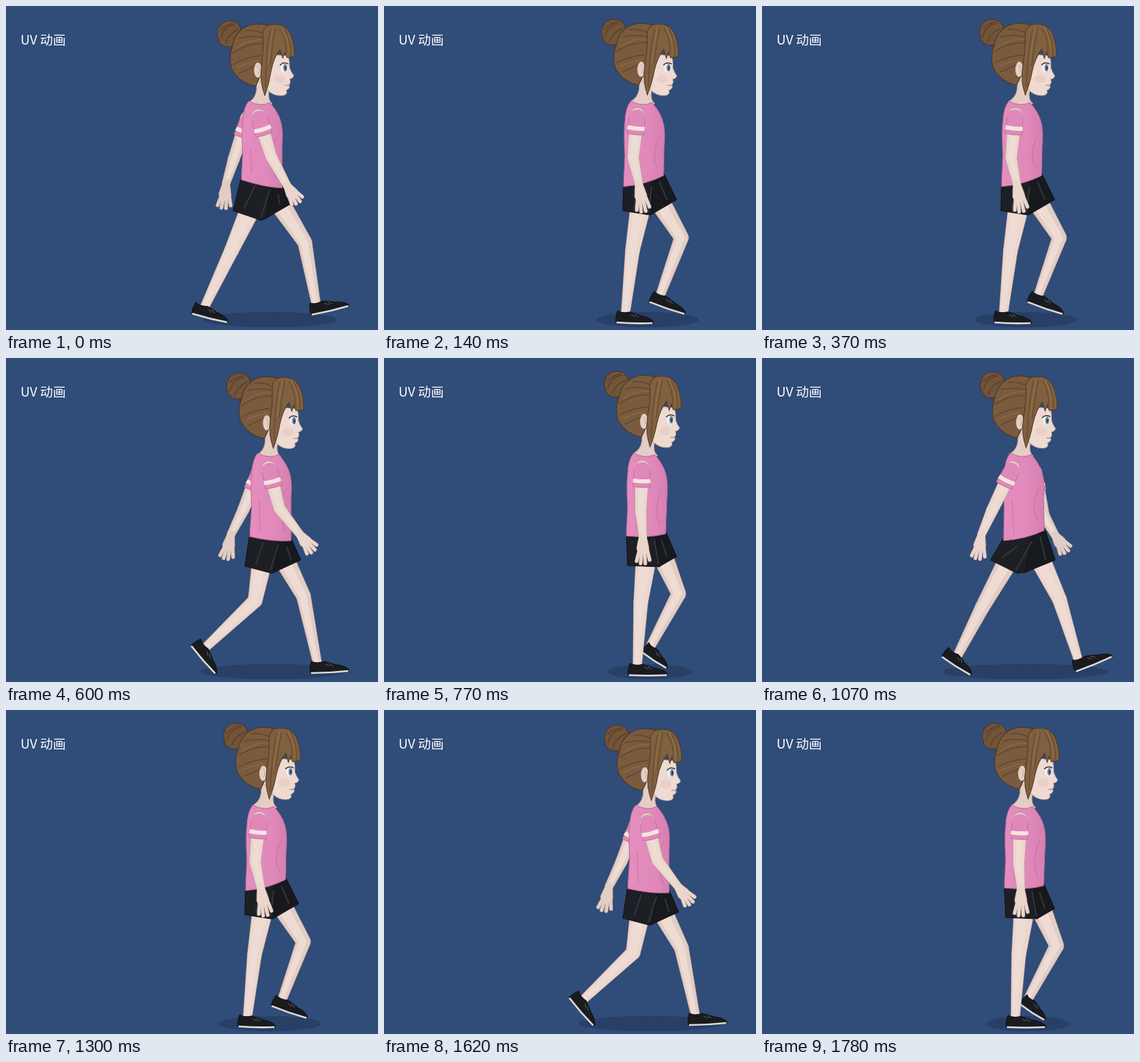
An HTML page with a canvas for the animation above (1860 ms loop, 539 by 470 pixels).

```html
<!DOCTYPE html>
<html lang="zh">
<head>
<meta charset="utf-8">
<style>
  html, body { margin: 0; width: 100%; height: 100%; overflow: hidden; background: #304c78; }
  canvas { display: block; }
</style>
</head>
<body>
<canvas id="stage" width="539" height="470"></canvas>
<script>
const ctx = document.getElementById('stage').getContext('2d');

const SKIN = '#ead6cd', SKIN_FAR = '#e2cdc4', SKIN_EDGE = '#b9a199';
const PINK = '#e088ba', PINK_EDGE = '#b9699a', HAIR = '#7a5b3e', HAIR_EDGE = '#4c3826';

// Six poses of one stride. Limbs are joint points x,y; feet are heel,toe;
// arms are shoulder,elbow,wrist,fingertips; shorts are the two leg openings.
const poses = [
  { head: [9, 0, .03], top: 8, hem: [350, 265, 409, 250], shadow: [262, 502],
    shorts: [331, 293, 369, 312, 381, 311, 425, 293],
    nearLeg: [402, 290, 431, 350, 457, 434], nearFoot: [454, 455, 508, 434],
    farLeg: [359, 290, 319, 362, 281, 436], farFoot: [260, 433, 302, 461],
    nearArm: [363, 160, 333, 222, 318, 256, 312, 293],
    farArm: [395, 165, 408, 228, 424, 256, 442, 283] },
  { head: [12, -1, .03], top: 10, hem: [351, 258, 408, 255], shadow: [325, 446],
    shorts: [353, 301, 399, 303, 400, 302, 424, 288],
    nearLeg: [380, 290, 372, 355, 367, 447], nearFoot: [354, 460, 411, 461],
    farLeg: [404, 288, 427, 342, 383, 424], farFoot: [373, 426, 409, 451],
    nearArm: [374, 159, 372, 222, 375, 258, 375, 300] },
  { head: [8, -1, .03], top: 6, hem: [347, 262, 405, 246], shadow: [308, 456],
    shorts: [346, 297, 384, 303, 388, 302, 424, 281],
    nearLeg: [372, 290, 360, 355, 350, 445], nearFoot: [336, 459, 390, 461],
    farLeg: [399, 283, 431, 336, 399, 423], farFoot: [384, 429, 436, 448],
    nearArm: [367, 158, 361, 220, 369, 257, 376, 300] },
  { head: [0, 0, 0], top: 0, hem: [341, 252, 400, 264], shadow: [285, 480],
    shorts: [329, 297, 370, 311, 378, 307, 411, 288],
    nearLeg: [356, 290, 327, 354, 288, 436], nearFoot: [269, 446, 321, 460],
    farLeg: [397, 287, 433, 343, 450, 436], farFoot: [442, 448, 497, 436],
    nearArm: [366, 160, 384, 218, 407, 260, 424, 287],
    farArm: [350, 163, 330, 222, 319, 257, 315, 295] },
  { head: [13, 1, .015], top: 13, hem: [353, 259, 413, 265], shadow: [282, 490],
    shorts: [346, 302, 384, 312, 388, 311, 427, 293],
    nearLeg: [372, 290, 361, 352, 289, 420], nearFoot: [268, 417, 303, 459],
    farLeg: [402, 290, 431, 345, 451, 442], farFoot: [441, 457, 497, 455],
    nearArm: [381, 160, 396, 218, 425, 255, 446, 282],
    farArm: [366, 165, 344, 220, 326, 256, 318, 293] },
  { head: [11, -1, .03], top: 9, hem: [350, 260, 407, 250], shadow: [316, 450],
    shorts: [351, 299, 390, 303, 393, 303, 424, 285],
    nearLeg: [400, 286, 430, 339, 392, 423], nearFoot: [379, 428, 427, 450],
    farLeg: [376, 290, 367, 355, 358, 446], farFoot: [345, 460, 400, 461],
    nearArm: [370, 159, 364, 221, 370, 257, 374, 300] }
];

// Each entry holds one pose; the holds are in hundredths of a second.
const order = [3, 2, 0, 5, 3, 2, 1, 5, 4, 2, 1, 5, 3, 2, 0, 5, 3, 2, 1, 0, 4, 3, 1];
const holds = [7, 8, 7, 8, 7, 8, 8, 7, 8, 9, 7, 8, 7, 8, 8, 7, 8, 16, 8, 8, 8, 8, 8];

function shape(d, fill, stroke, width = 1) {
  const path = new Path2D(d);
  if (fill) { ctx.fillStyle = fill; ctx.fill(path); }
  if (stroke) { ctx.strokeStyle = stroke; ctx.lineWidth = width; ctx.stroke(path); }
}

function oval(x, y, rx, ry, fill, turn = 0) {
  ctx.fillStyle = fill;
  ctx.beginPath();
  ctx.ellipse(x, y, rx, ry, turn, 0, 7);
  ctx.fill();
}

// Tapered tube through the joints.
function tube(p, widths, fill, edge) {
  const parts = [];
  for (let i = 0; i < widths.length; i++) {
    const [x, y, x2, y2] = p.slice(i * 2, i * 2 + 4), r = widths[i] / 2;
    const joint = new Path2D();
    joint.arc(x, y, r, 0, 7);
    parts.push(joint);
    if (i == widths.length - 1) break;
    const a = Math.atan2(y2 - y, x2 - x), nx = -Math.sin(a), ny = Math.cos(a), r2 = widths[i + 1] / 2;
    parts.push(new Path2D(`M${x + nx * r} ${y + ny * r}L${x2 + nx * r2} ${y2 + ny * r2}` +
      `L${x2 - nx * r2} ${y2 - ny * r2}L${x - nx * r} ${y - ny * r}Z`));
  }
  ctx.strokeStyle = edge;
  ctx.lineWidth = 1.4;
  if (edge) parts.forEach(s => ctx.stroke(s));
  ctx.fillStyle = fill;
  parts.forEach(s => ctx.fill(s));
}

function local(x, y, x2, y2, draw) {
  ctx.save();
  ctx.translate(x, y);
  ctx.rotate(Math.atan2(y2 - y, x2 - x));
  draw(Math.hypot(x2 - x, y2 - y));
  ctx.restore();
}

function leg(joints, foot, skin) {
  tube(joints, [29, 20, 12], skin, SKIN_EDGE);
  tube(joints.map((v, i) => v - (i % 2 ? 0 : 1)), [16, 11, 6], '#eedcd4');
  local(...foot, len => {
    ctx.scale(len / 55, 1);
    shape('M0 -1Q-1 -10 2 -17Q9 -13 20 -16Q29 -14 36 -11Q50 -9 55 -3L54 0Z', '#191b1f', '#0f1115');
    shape('M22 -12L28 -9M27 -13L33 -9', null, '#4c4f55', 1.3);
    shape('M1 0Q28 1 54 -1', null, '#dedbd6', 2.6);
  });
}

function hand(x, y, tx, ty, skin) {
  local(x, y, tx, ty, len => {
    ctx.lineCap = 'round';
    const fingers = [[-8, -11, .88], [-3, -4, 1], [2, 3.5, 1], [6, 10, .92]];
    for (const [color, width] of [[SKIN_EDGE, 5.6], [skin, 4.4]])
      for (const [from, to, reach] of fingers)
        shape(`M${len * .48} ${from * .8}L${len * reach - 2} ${to * .9}`, null, color, width);
    tube([0, 0, len * .42, 0], [11, 18], skin);
    shape(`M${len * .18} 7L${len * .45} 9M${len * .18} -7L${len * .45} -9`, null, SKIN_EDGE, .8);
    ctx.lineCap = 'butt';
  });
}

function arm(p, skin, size) {
  const [sx, sy, ex, ey, wx, wy, tx, ty] = p;
  tube(p.slice(0, 6), [20, 16, 11], skin, SKIN_EDGE);
  tube(p.slice(0, 6), [11, 8, 5], '#eedcd4');
  hand(wx, wy, tx, ty, skin);
  local(sx, sy, ex, ey, () => {
    const r = size / 2;
    shape(`M-4 ${-r * .75}Q14 ${-r} 28 ${-r}Q30 0 28 ${r}Q14 ${r} -4 ${r * .75}Q-12 0 -4 ${-r * .75}Z`, PINK);
    shape(`M4 ${-r * .9}L28 ${-r}Q30 0 28 ${r}L4 ${r * .9}`, null, PINK_EDGE, .8);
    shape(`M19 ${-r}Q21 0 19 ${r}`, null, '#f3e5df', 6);
  });
}

function inHead([dx, dy, turn], draw) {
  ctx.save();
  ctx.translate(370 + dx, 80 + dy);
  ctx.rotate(turn);
  ctx.translate(-370, -80);
  draw();
  ctx.restore();
}

function neck() {
  shape('M363 104L363 122Q361 135 351 140L371 153L386 142Q379 137 381 123Z', '#e3cdc4', SKIN_EDGE);
}

function face() {
  shape('M306 42Q306 26 320 22Q337 20 340 33Q342 47 331 57Q318 63 309 53Z', '#725439', HAIR_EDGE, 1.2);
  shape('M311 48Q314 30 332 27M318 55Q321 41 337 34M310 36Q319 27 330 25', null, '#573f2b', 1.4);
  shape('M372 70L409 72Q411 82 411 90Q413 96 417 101Q416 105 411 106Q413 110 411 113' +
    'Q408 115 411 117Q410 121 406 122Q409 129 400 130Q388 131 379 122L366 108Z', '#eedad1', SKIN_EDGE, .8);
  shape('M328 58Q322 76 327 91Q338 112 362 116L369 100L380 82L380 28Q353 22 339 36Q330 45 328 58Z', HAIR, HAIR_EDGE, 1.2);
  shape('M328 69Q346 55 372 54M329 85Q348 74 370 72M337 98Q351 92 362 86M346 36Q360 34 373 40M336 47Q355 42 372 46',
    null, '#604630', 1.4);
  shape('M333 62Q350 48 371 49M334 90Q350 82 366 79', null, '#8a6a48', 1.4);
  oval(365, 93, 5.5, 11, '#e6cfc5');
  shape('M364 86Q369 90 366 99', null, '#c9aca0');
  oval(396, 106, 8, 6, 'rgba(226,180,170,.28)');
  oval(403, 89.5, 5, 7, '#eef0f1');
  oval(404.5, 89.5, 2.8, 5.5, '#7288a5');
  oval(405, 90, 1.3, 3, '#2d3a50');
  shape('M397 86Q402 80 409 84', null, '#3c322e', 1.5);
  shape('M404 115L411 115', null, '#c48b83', 1.4);
  shape('M380 28Q405 22 413 43Q419 58 418 73L407 75L404 67L401 76L397 63Q388 74 384 95' +
    'Q381 114 375 130Q367 108 370 88Q374 60 372 40Q374 31 380 28Z', '#80603f', HAIR_EDGE, 1);
  shape('M383 34Q377 60 376 118M390 32Q386 55 383 87M396 32Q406 46 406 68M403 33Q413 48 413 72', null, '#634830', 1.2);
  shape('M387 31Q382 55 380 84M399 31Q410 47 410 69', null, '#957350', 1.1);
}

function shirt({ top: u, hem: [lx, ly, rx, ry] }) {
  const g = ctx.createLinearGradient(345 + u, 0, 405 + u, 0);
  g.addColorStop(0, '#e48dbe');
  g.addColorStop(.55, '#e188ba');
  g.addColorStop(1, '#d27eaf');
  const at = (x, y) => `${x + u} ${y} `;
  shape(`M${at(352, 138)}Q${at(369, 147)}${at(382, 140)}Q${at(394, 153)}${at(398, 167)}Q${at(402, 180)}${at(400, 202)}` +
    `L${rx} ${ry}Q${(lx + rx) / 2 + 4} ${(ly + ry) / 2 + 5} ${lx} ${ly}` +
    `L${at(343, 216)}Q${at(341, 185)}${at(343, 168)}Q${at(344, 146)}${at(352, 138)}Z`, g, PINK_EDGE);
  shape(`M${at(392, 190)}Q${at(380, 222)}${rx - 8} ${ry - 12}M${at(354, 205)}L${lx + 15} ${ly - 9}`,
    null, 'rgba(180,92,145,.35)', 1.6);
}

function shorts({ hem: [lx, ly, rx, ry], shorts: [ax, ay, bx, by, cx, cy, dx, dy] }) {
  const mx = (lx + rx) / 2 + 8, my = (ly + ry) / 2;
  shape(`M${mx} ${my - 4}L${rx} ${ry - 4}L${dx} ${dy}L${cx} ${cy}L${bx} ${by}Z`, '#17191d', '#0e1013');
  shape(`M${lx} ${ly - 4}L${ax} ${ay}L${bx} ${by}L${cx} ${cy}L${mx + 5} ${my - 3}Z`, '#1d1f24', '#101215');
  shape(`M${lx + 20} ${ly + 8}L${ax + 16} ${ay - 3}M${mx + 4} ${my + 8}L${bx - 1} ${by - 4}M${rx - 6} ${ry + 9}L${dx - 14} ${dy}`,
    null, '#32363d', 2);
}

function draw(p) {
  ctx.fillStyle = '#304c78';
  ctx.fillRect(0, 0, 539, 470);
  ctx.fillStyle = '#fff';
  ctx.font = '18.7px "Noto Sans CJK SC", "Noto Sans CJK", sans-serif';
  ctx.fillText('UV 动画', 21, 55.5);

  const [left, right] = p.shadow;
  oval((left + right) / 2, 455, (right - left) / 2, 11, '#283f66');
  if (p.farArm) arm(p.farArm, SKIN_FAR, 22);
  leg(p.farLeg, p.farFoot, SKIN_FAR);
  leg(p.nearLeg, p.nearFoot, SKIN);
  shorts(p);
  inHead(p.head, neck);
  shirt(p);
  inHead(p.head, face);
  arm(p.nearArm, SKIN, 25);
}

function tick() {
  let rest = performance.now() % 1860 / 10, i = 0;
  while (rest >= holds[i]) rest -= holds[i++];
  draw(poses[order[i]]);
  requestAnimationFrame(tick);
}
tick();
</script>
</body>
</html>
```
